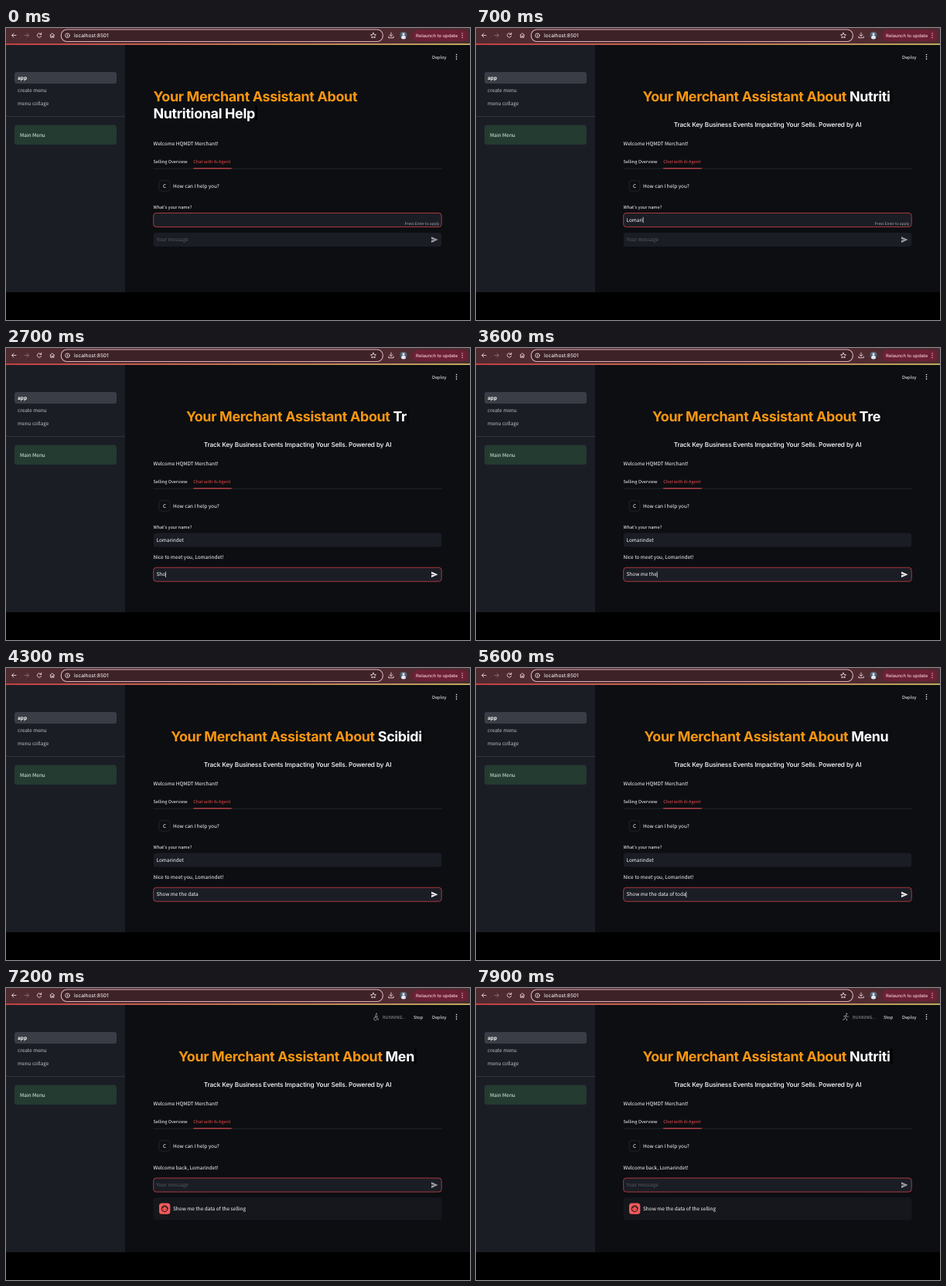
Animation of 600 by 378 pixels, one loop 8000 ms. Source, as an HTML page:

```html
<!DOCTYPE html>
<html lang="en">
<head>
<meta charset="utf-8">
<title>Merchant assistant</title>
<style>
  html, body { margin: 0; width: 100%; height: 100%; overflow: hidden; background: #000; }
  svg { display: block; width: 600px; height: 378px; }
  text { font: 500 6.47px "Noto Sans CJK SC", "Noto Sans CJK JP", "Noto Sans CJK", "Open Sans", sans-serif;
         fill: #fff; white-space: pre; text-rendering: geometricPrecision; }
  text.small { font-size: 5.67px; }
  text.tiny { font-size: 4.85px; fill: #a8a9ae; }
  text.ui { font-family: Inter, sans-serif; }
  .line { fill: none; stroke-linecap: round; stroke-linejoin: round; }
  .field { fill: #1b1d25; stroke-width: .9; }
  #head { font-size: 17.9px; font-weight: 700; letter-spacing: -.33px; }
  #lead { fill: #fa970f; }
  #sub { font-size: 8.3px; letter-spacing: -.14px; }
</style>
</head>
<body>
<svg viewBox="0 0 600 378">
  <defs>
    <linearGradient id="strip"><stop stop-color="#f04848"/><stop offset="1" stop-color="#e8d873"/></linearGradient>
    <linearGradient id="photo" x2="0" y2="1"><stop stop-color="#6b7b92"/><stop offset="1" stop-color="#2b3445"/></linearGradient>
  </defs>

  <!-- browser bar -->
  <rect width="600" height="21" fill="#4e2a31"/>
  <rect x="71.300" y="2" width="416" height="15.500" rx="7.500" fill="#3d2228" stroke="#dcacb4" stroke-width="1.200"/>
  <g class="line" stroke="#ead3d7" stroke-width=".9">
    <path d="M13 9.500H7.500M10 7 7.500 9.500 10 12"/>
    <path d="M24 9.500h5.500M27 7l2.500 2.500L27 12" stroke="#8d6a72"/>
    <path d="M45.300 8a2.700 2.700 0 1 0 .3 2.400M45.700 6.400v2h-2"/>
    <path d="M57 9.300 59.800 6.800 62.600 9.300M57.700 9v3.300h1.400V10.400h1.400v1.900h1.400V9"/>
    <circle cx="79.500" cy="9.700" r="2.800"/><path d="M79.500 9.500v1.600M79.500 8.100v.1"/>
    <path d="m475 6.200 1.050 2.250 2.450.3-1.800 1.700.45 2.450-2.150-1.200-2.150 1.200.45-2.450-1.800-1.700 2.450-.3z"/>
    <path d="M498 6v4.500M496 8.700l2 2 2-2M494.800 11v1.700h6.400V11"/>
  </g>
  <text class="ui" x="88" y="12" style="font-size:6.55px;font-weight:400">localhost:8501</text>
  <circle cx="514" cy="9.700" r="4.800" fill="url(#photo)"/>
  <path d="M511 13.300q0-3.700 3-3.700t3 3.700a4.800 4.800 0 0 1-6 0z" fill="#e4e8ee"/>
  <circle cx="514" cy="8" r="1.500" fill="#e4e8ee"/>
  <rect x="525" y="2.500" width="72" height="14.500" rx="7.200" fill="#6c2035"/>
  <text class="ui" x="530" y="11.900" style="font-size:5.9px;fill:#f5cbd3">Relaunch to update</text>
  <g fill="#f5cbd3"><circle cx="590" cy="7" r=".7"/><circle cx="590" cy="9.700" r=".7"/><circle cx="590" cy="12.400" r=".7"/></g>

  <!-- page -->
  <rect y="21" width="600" height="321" fill="#0c0e12"/>
  <rect y="21" width="154" height="321" fill="#1b1d25"/>
  <rect y="20.300" width="600" height="1.500" fill="url(#strip)"/>
  <rect x="11" y="57" width="132" height="15" rx="3" fill="#3b3d46"/>
  <text x="15" y="67" style="font-weight:700">app</text>
  <text x="15" y="83.400" style="fill:#c2c3c7">create menu</text>
  <text x="15" y="100.200" style="fill:#c2c3c7">menu collage</text>
  <rect y="114" width="154" height=".8" fill="#383a42"/>
  <rect x="11" y="125.500" width="132" height="25.500" rx="3.500" fill="#233b30"/>
  <text x="18" y="141" style="fill:#e8f8ed">Main Menu</text>
  <text class="small" x="551" y="39.500">Deploy</text>
  <g fill="#fff"><circle cx="582.500" cy="34.500" r=".8"/><circle cx="582.500" cy="37.300" r=".8"/><circle cx="582.500" cy="40.100" r=".8"/></g>

  <g id="running">
    <path id="runner" class="line" stroke="#9a9ba0" stroke-width=".9"/>
    <circle id="runnerHead" r="1" fill="#9a9ba0"/>
    <text class="small" x="487" y="39.500" style="fill:#97989d">RUNNING...</text>
    <text class="small" x="527" y="39.500">Stop</text>
  </g>

  <rect id="headCaret" width="2.500" height="20"/>
  <text id="head" class="ui" y="94.700"><tspan id="lead">Your Merchant Assistant About </tspan><tspan id="word"></tspan></text>
  <text id="sub" class="ui" x="377" y="128.400" text-anchor="middle">Track Key Business Events Impacting Your Sells. Powered by AI</text>

  <text x="190.500" y="152.300">Welcome HQMDT Merchant!</text>
  <text class="small" x="190.500" y="174.600">Selling Overview</text>
  <text class="small" x="242.300" y="174.600" style="fill:#ee4a4c">Chat with Ai Agent</text>
  <rect x="190.500" y="181.600" width="373" height=".8" fill="#292b32"/>
  <rect x="242.300" y="181.200" width="49.500" height="1.100" fill="#e0474a"/>
  <rect x="198" y="197.300" width="14" height="14" rx="3.500" fill="#0c0e12" stroke="#2c2e35" stroke-width=".7"/>
  <text x="205" y="206.700" text-anchor="middle">C</text>
  <text x="216" y="206.700">How can I help you?</text>

  <g id="ask">
    <text class="small" x="190.500" y="234.200">What's your name?</text>
    <rect id="nameBox" class="field" x="190.700" y="239.500" width="372.500" height="18" rx="3.500"/>
    <text id="name" x="194.500" y="250.700"></text>
    <text id="hint" class="tiny" x="560.300" y="255" text-anchor="end">Press Enter to apply</text>
  </g>
  <text id="greet" x="190.500"></text>

  <g id="bar">
    <rect id="barBox" class="field" x="190.700" width="372.500" height="18" rx="3.500"/>
    <text id="msg" x="194.500" y="11.300"></text>
    <path id="send" d="M550 5.300 558.500 9.100 550 12.900V9.900L555 9.100 550 8.300z"/>
  </g>
  <rect id="caret" width=".7" height="7.500" fill="#f4f4f5"/>

  <g id="sent">
    <rect x="190.500" y="271.300" width="373" height="29" rx="4" fill="#15171c"/>
    <rect x="198" y="278.500" width="14.300" height="14.300" rx="3.500" fill="#f65a5a"/>
    <g class="line" stroke="#1a1416" stroke-width="1">
      <circle cx="205.100" cy="285.700" r="3.900"/><path d="M201.400 284.700q3 0 4-2.500 1 2.500 3.600 2.300M203.600 286.900v.1M206.600 286.900v.1"/>
    </g>
    <text x="216" y="288.300">Show me the data of the selling</text>
  </g>

  <path id="beam" class="line" stroke="#d8d8da" stroke-width=".9" d="M-1.800-3.800Q0-3.800 0-2.800 0-3.800 1.800-3.800M0-2.800V2.800M-1.800 3.800Q0 3.800 0 2.800 0 3.800 1.800 3.800M-1 .8h2"/>
</svg>
<script>
const $ = id => document.getElementById(id);
const set = (id, attrs) => { for (const k in attrs) $(id).setAttribute(k, attrs[k]); };
const show = (id, on) => { $(id).style.display = on ? "" : "none"; };
const write = (id, s) => { if ($(id).textContent !== s) $(id).textContent = s; };
const clamp = (v, lo, hi) => Math.max(lo, Math.min(hi, v));

// Piecewise linear value through [time, value] points
function along(points, t) {
  let i = 1;
  while (i < points.length - 1 && t > points[i][0]) i++;
  const [t0, a] = points[i - 1], [t1, b] = points[i];
  return a + (b - a) * clamp((t - t0) / (t1 - t0), 0, 1);
}

const LOOP = 8000, LEFT = 190.5, WIDTH = 373, KEY = 50;
const GUEST = "Lomarindet";
const APPLY = 1650, FOCUS = 2150, SEND = 6600;

// word, typing start, deleting start
const words = [
  ["Nutritional Help", -2000, 235], ["Rating", 1235, 2085], ["Trends", 2585, 3435],
  ["Scibidi", 3935, 4835], ["Menu Creation", 5385, 6675], ["Nutritional Help", 7525, 9999]
];
const draftKeys = [[2360, 0], [2680, 3.3], [4180, 16.4], [4700, 16.4], [5570, 24.4], [5650, 24.4], [5850, 20], [6430, 31.2]];

// body path, head x, head y
const poses = [
  ["M478 35.500v3.200h2.500l1 2.500M478 36.500h2.500M477 37.500a2.300 2.300 0 1 0 3 3", 479, 33.5],
  ["M478.500 35.500l-1 3 2 1.500v2M477.500 38.500l-1.500 2.500h-1.500M475.500 37l3-1.500 1.500 1.500h1.500", 479.3, 33.5],
  ["M478 35.500v3l-2 3M478 38.500l2.500 1v2M475.500 37.500l2.500-2 3 1", 478, 33.5]
];

function heading(t) {
  const [text, start, erase] = words.filter(w => t >= w[1]).pop();
  const n = t < erase ? (t - start) / KEY : text.length - Math.floor((t - erase) / KEY);
  write("word", text.slice(0, clamp(Math.floor(n), 0, text.length)));
  const word = $("word");
  word.removeAttribute("x");
  word.removeAttribute("y");
  const len = $("head").getComputedTextLength();
  const wrap = len + 3 > WIDTH;
  const x = wrap ? LEFT : LEFT + (WIDTH - len - 3) / 2;
  set("head", { x });
  if (wrap) set("word", { x: LEFT, y: 116.5 });
  show("sub", !wrap);
  const end = wrap ? LEFT + word.getComputedTextLength() : x + len;
  set("headCaret", { x: end + .3, y: wrap ? 100 : 78, opacity: .5 + .5 * Math.cos(t * Math.PI / 500) });
}

function form(t) {
  const applied = t >= APPLY, sent = t >= SEND, focused = t >= FOCUS;
  const blink = t % 1000 > 400 && t % 1000 < 850;
  show("ask", !sent);
  show("hint", !applied);
  set("nameBox", { stroke: applied ? "none" : "#b9403f" });
  write("name", GUEST.slice(0, clamp(Math.floor((t - 150) / 85), 0, 10)));

  show("greet", applied);
  set("greet", { y: sent ? 234.5 : 273 });
  write("greet", sent ? `Welcome back, ${GUEST}!` : `Nice to meet you, ${GUEST}!`);

  const y = sent ? 246 : applied ? 284.2 : 265;
  const count = sent ? 0 : Math.floor(along(draftKeys, t));
  const draft = "Show me the data of " + (t < 5850 ? "today" : "the selling");
  write("msg", count ? draft.slice(0, count) : "Your message");
  $("msg").style.fill = count ? "" : "#5b5d65";
  set("bar", { transform: `translate(0 ${y})` });
  set("barBox", { stroke: focused ? "#b83d42" : "none" });
  set("send", { fill: count ? "#eeeeef" : "#a0a1a6" });

  const naming = t > 150 && t < 1050;
  const field = naming ? "name" : "msg";
  const typed = naming || count ? $(field).getComputedTextLength() : 0;
  const busy = naming || (t > 2360 && t < 4200) || (t > 4700 && t < SEND);
  show("caret", busy || (focused && blink));
  set("caret", { x: LEFT + 4 + typed, y: naming ? 244.7 : y + 5.3 });

  show("sent", sent);
  show("running", sent);
  const [d, cx, cy] = poses[Math.floor(t / 100) % poses.length];
  set("runner", { d });
  set("runnerHead", { cx, cy });

  show("beam", t > 1150 && t < 2360);
  const by = along([[1150, 262], [1350, 273.5], [1800, 273.5], [2100, 290]], t);
  set("beam", { transform: `translate(361 ${by})` });
}

function draw(now) {
  const t = now % LOOP;
  heading(t);
  form(t);
  requestAnimationFrame(draw);
}
draw(0);
</script>
</body>
</html>
```
